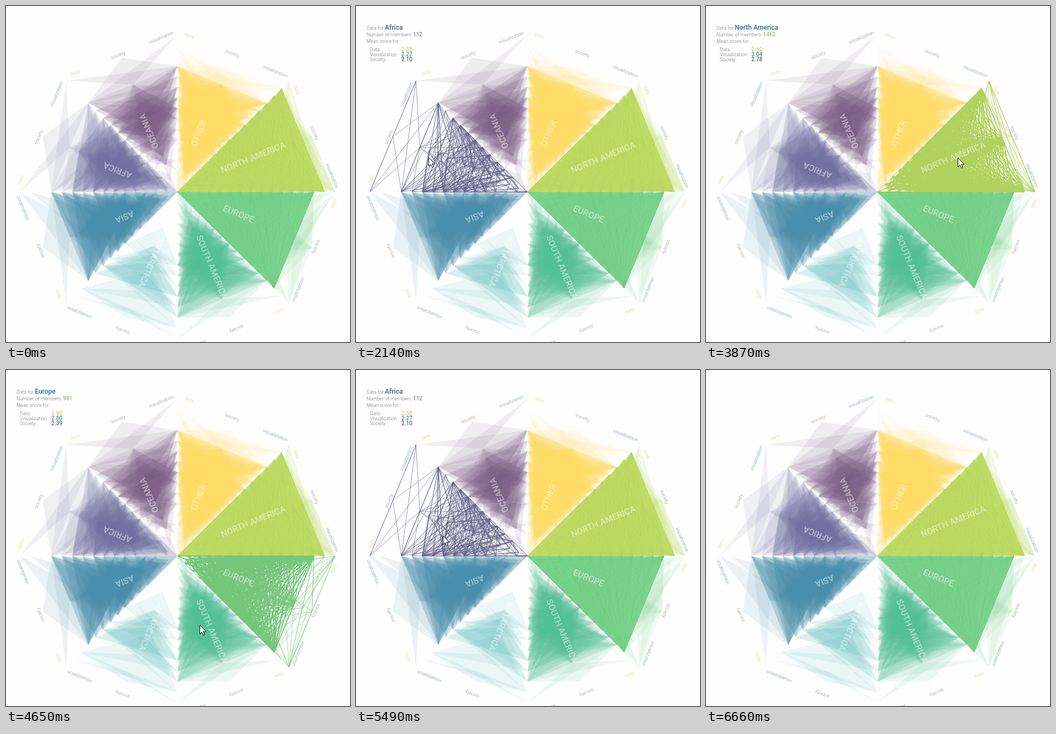
Write an HTML page with a canvas that moves like this. It is 622 by 609 pixels and loops after 8070 ms.

```html
<!DOCTYPE html>
<html lang="en">
<head>
<meta charset="utf-8">
<title>Scores by continent</title>
<style>
  html, body { margin: 0; width: 100%; height: 100%; overflow: hidden; background: #fefefe; }
  canvas, svg { position: absolute; left: 0; top: 0; display: block; }
  text { font: 300 8.8px Roboto, sans-serif; fill: #777; }
  .region { font-weight: 500; font-size: 15.8px; fill: #fff; fill-opacity: .48; }
  .axis { text-anchor: middle; }
  .data { fill: #f3cd62; }
  .society { fill: #969a90; }
  .visualization { fill: #6c9c9d; }
  .name { font-weight: 700; font-size: 12px; }
  .num { font-weight: 500; font-size: 10px; }
</style>
</head>
<body>
<canvas id="chart" width="622" height="609"></canvas>
<svg id="over" width="622" height="609" viewBox="0 0 622 609">
  <g id="labels"></g>
  <g id="info">
    <text x="19" y="43">Data for</text>
    <text x="19" y="55">Number of members:</text>
    <text x="19" y="67">Mean score for :</text>
    <text x="25" y="82">Data:</text>
    <text x="25" y="91">Visualization:</text>
    <text x="25" y="100">Society:</text>
    <text id="name" class="name" x="52" y="43"></text>
    <text id="count" class="num" x="103" y="55"></text>
    <text id="data" class="num" x="82" y="82" style="fill:#e6c47c"></text>
    <text id="visualization" class="num" x="82" y="91" style="fill:#3d90a0"></text>
    <text id="society" class="num" x="82" y="100" style="fill:#606060"></text>
  </g>
  <path id="cursor" d="M.5 .5V16.5L4.2 13L6.8 18.6L9.2 17.5L6.7 12H11.8Z" fill="#fff" stroke="#111"/>
</svg>
<script>
const W = 622, H = 609, CX = 310, CY = 337, STEP = 19, LOOP = 8070;
const BG = '#fefefe', TAU = 2 * Math.PI, SLICE = TAU / 8, CHORD = Math.cos(SLICE / 2);
const $ = id => document.getElementById(id);

// clockwise from the right; cap holds most scores, peak holds the rare ones (thirds of a point)
const regions = [
  { name: 'Europe', count: 981, data: 2.80, society: 2.39, visualization: 2.80,
    cap: 13, peak: 15, fill: '#7bce86', line: '#78c77c', tone: '#3f7fb5', num: '#80c67d' },
  { name: 'South America', count: 124, data: 2.71, society: 2.33, visualization: 2.42,
    cap: 12, peak: 14, fill: '#4cb596', line: '#45ab8e', tone: '#3f7fb5', num: '#6fb5a0' },
  { name: 'Antarctica', count: 18, data: 3.50, society: 2.48, visualization: 3.24,
    cap: 13, peak: 14, fill: '#4aabab', line: '#3b9f9f', tone: '#3b6fb6', num: '#85898f' },
  { name: 'Asia', count: 148, data: 2.56, society: 2.31, visualization: 2.49,
    cap: 12, peak: 15, fill: '#4a8aa3', line: '#47859c', tone: '#3f7fa8', num: '#7f929c' },
  { name: 'Africa', count: 112, data: 2.38, society: 2.10, visualization: 2.27,
    cap: 12, peak: 15, fill: '#6c6c9a', line: '#62628a', tone: '#4a7ba6', num: '#858a98' },
  { name: 'Oceania', count: 74, data: 2.70, society: 2.38, visualization: 2.75,
    cap: 12, peak: 15, fill: '#7b5d7e', line: '#745878', tone: '#6a5f90', num: '#8a7f8c' },
  { name: 'Other', count: 200, data: 2.67, society: 2.44, visualization: 2.51,
    cap: 12, peak: 14, fill: '#f9d766', line: '#f5d75e', tone: '#62659a', num: '#6f6663' },
  { name: 'North America', count: 1460, data: 2.62, society: 2.78, visualization: 3.04,
    cap: 14, peak: 15, fill: '#b8d966', line: '#b2d160', tone: '#4a7fb0', num: '#a5c66a' }
];
const axes = ['data', 'society', 'visualization'];

let seed = 20177;
const rand = () => (seed = seed * 16807 % 2147483647) / 2147483647;
const gauss = () => (rand() + rand() + rand()) * 2 - 3;

function members(r) {
  // one member extreme on each axis, one on all of them, the rest at random
  const list = [0, 1, 2, 3].map(k => axes.map((_, j) => k === 3 || k === j ? r.peak : r.cap));
  const spread = Math.log10(r.count) / 2;
  while (list.length < r.count) {
    const shared = gauss() * 1.8, top = rand() < .04 ? r.peak : r.cap;
    list.push(axes.map(key => {
      const score = Math.round(r[key] * 3 + spread * (shared + gauss() * 2.4));
      return Math.max(0, Math.min(top, score));
    }));
  }
  return list;
}

function layer(r, i, list, outline) {
  const c = document.createElement('canvas');
  c.width = W;
  c.height = H;
  const g = c.getContext('2d');
  g.fillStyle = BG;
  g.fillRect(0, 0, W, H);
  g.translate(CX, CY);
  g.fillStyle = r.fill;
  g.strokeStyle = r.line;
  g.lineWidth = .85;
  g.lineJoin = 'bevel';
  g.globalAlpha = outline ? .75 : .1;
  for (const tri of list) {
    g.beginPath();
    tri.forEach((v, k) => {
      const a = (i + k / 2) * SLICE, d = v * STEP * (k === 1 ? CHORD : 1);
      g.lineTo(d * Math.cos(a), d * Math.sin(a));
    });
    g.closePath();
    outline ? g.stroke() : g.fill();
  }
  return c;
}

function label(cls, str, turn, x, y) {
  const t = document.createElementNS('http://www.w3.org/2000/svg', 'text');
  t.setAttribute('class', cls);
  t.setAttribute('transform', `translate(${CX} ${CY}) rotate(${turn})`);
  t.setAttribute('x', x);
  t.setAttribute('y', y);
  t.textContent = str;
  $('labels').append(t);
}

regions.forEach((r, i) => {
  const list = members(r), turn = (i + .5) * 45;
  r.solid = layer(r, i, list, false);
  r.wire = layer(r, i, list, true);
  label('region', r.name.toUpperCase(), turn, 88, 0);
  axes.forEach((key, k) => label('axis ' + key, key, turn + 90, -88 + k * 84, -267));
});

// pointer moves: start, end, number of stops, x and y reached
const moves = [
  [580, 810, 4, 243, 514],
  [1210, 1970, 11, 131, 292],
  [2050, 2140, 2, 131, 274],
  [2450, 3170, 11, 326, 183],
  [3320, 3410, 2, 335, 183],
  [3640, 3870, 4, 455, 275],
  [4110, 4420, 5, 465, 395],
  [4570, 4650, 2, 350, 462],
  [4730, 4730, 1, 350, 462],
  [5050, 5490, 7, 157, 300],
  [5570, 5810, 4, 330, 160],
  [5890, 6580, 10, 375, 604]
];

const polar = (x, y) => ({ a: Math.atan2(y - CY, x - CX), d: Math.hypot(x - CX, y - CY) });
const easeOut = p => 1 - (1 - p) ** 2;
const regionAt = a => Math.floor((a / SLICE + 16) % 8);

// the pointer circles the centre the short way; the highlight trails it by one stop
const none = { at: 0, pos: null, hover: -1 };
const poses = [none];
let from = polar(262, 598), hover = -1;
for (const [t0, t1, stops, x, y] of moves) {
  const to = polar(x, y);
  const turn = Math.atan2(Math.sin(to.a - from.a), Math.cos(to.a - from.a));
  for (let i = 0; i < stops; i++) {
    const p = i / Math.max(1, stops - 1), e = easeOut(p);
    const a = from.a + turn * e, d = from.d + (to.d - from.d) * e;
    const pos = [Math.round(CX + d * Math.cos(a)), Math.round(CY + d * Math.sin(a))];
    poses.push({ at: t0 + (t1 - t0) * p, pos, hover });
    hover = regionAt(a);
  }
  from = to;
}
poses.push({ ...none, at: 6660 });

const ctx = $('chart').getContext('2d');
let drawn = null;

function drawChart(active) {
  if (active === drawn) return;
  drawn = active;
  ctx.globalCompositeOperation = 'source-over';
  ctx.fillStyle = BG;
  ctx.fillRect(0, 0, W, H);
  ctx.globalCompositeOperation = 'darken';
  regions.forEach((r, i) => ctx.drawImage(i === active ? r.wire : r.solid, 0, 0));
  $('info').style.display = active < 0 ? 'none' : '';
  if (active < 0) return;
  const r = regions[active];
  $('name').textContent = r.name;
  $('name').style.fill = r.tone;
  $('count').textContent = r.count;
  $('count').style.fill = r.num;
  for (const key of axes) $(key).textContent = r[key].toFixed(2);
}

function render(t) {
  let pose = none;
  for (const p of poses) if (p.at <= t + .01) pose = p;
  drawChart(pose.hover);
  $('cursor').style.display = pose.pos ? '' : 'none';
  if (pose.pos) $('cursor').setAttribute('transform', `translate(${pose.pos})`);
}

const start = performance.now();
function tick() {
  render((performance.now() - start) % LOOP);
  requestAnimationFrame(tick);
}
tick();
</script>
</body>
</html>
```
